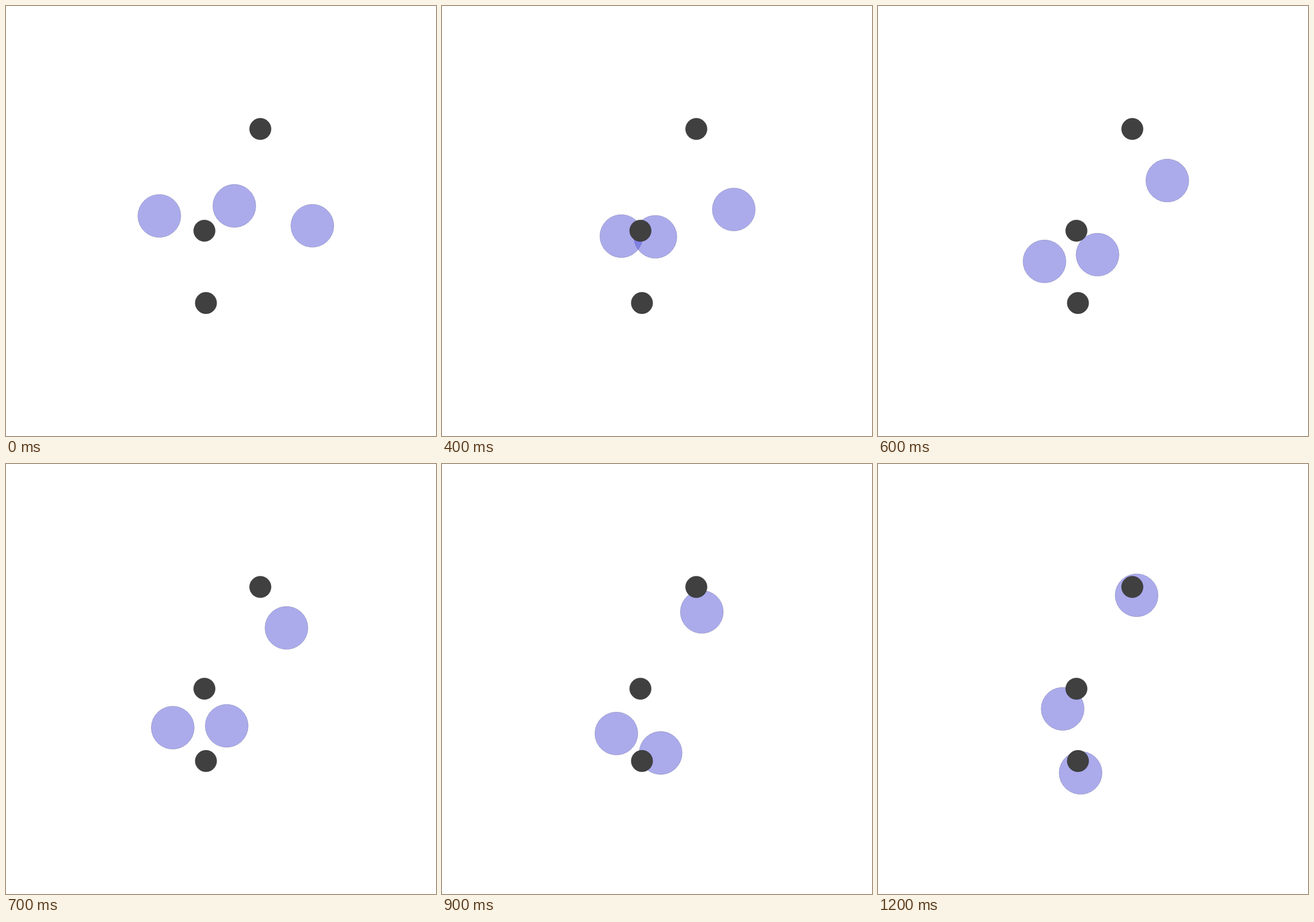
An HTML page for the animation above (1300 ms loop, 700x700 px).

```html
<!DOCTYPE html>
<html lang="en">
<head>
<meta charset="utf-8">
<title>Drifting circles</title>
<style>
  html, body { margin: 0; width: 100%; height: 100%; overflow: hidden; background: #fff; }
  svg { display: block; width: 100vw; height: 100vh; }
  .agent { fill: rgb(89 89 217 / .5); stroke: rgb(45 45 108 / .25); }
  .anchor { fill: #404040; stroke: rgb(32 32 32 / .5); }
</style>
</head>
<body>
<svg viewBox="0 0 700 700"></svg>
<script>
  const STEP = 100, STEPS = 13, LAST = STEPS - 1;
  const BOUNCE = 4; // the step at which the two left agents collide
  const SIDES = 30;

  // Bézier control points before and after the bounce.
  const agents = [
    { before: [[249.6, 341.7], [292, 374.6]],
      after: [[292, 374.6], [239.2, 440.1], [300.3, 467.8], [300.6, 398.6]] },
    { before: [[371.7, 325.4], [366.5, 353.9], [347.4, 375.7]],
      after: [[347.4, 375.7], [365.6, 395.7], [365.7, 508.6], [329.8, 502.8]] },
    { before: [[498.7, 357.7], [480.2, 376.1], [475, 331.3]],
      after: [[475, 331.3], [502.4, 255.7], [370.2, 236], [421, 213.7]] }
  ];
  const anchors = [[414, 200.2], [323, 365.8], [325.5, 483.5]];

  const svg = document.querySelector('svg');

  function addDisc(name, radius) {
    const disc = document.createElementNS(svg.namespaceURI, 'polygon');
    const corners = Array.from({ length: SIDES }, (_, i) => {
      const angle = 2 * Math.PI * i / SIDES;
      return [radius * Math.cos(angle), radius * Math.sin(angle)];
    });
    disc.setAttribute('points', corners.join(' '));
    disc.setAttribute('class', name);
    return svg.appendChild(disc);
  }

  function place(disc, point) {
    disc.setAttribute('transform', `translate(${point})`);
  }

  // Point on a Bézier curve of any degree.
  function bezier(points, u) {
    if (points.length === 1) return points[0];
    const a = bezier(points.slice(0, -1), u), b = bezier(points.slice(1), u);
    return a.map((value, i) => value + (b[i] - value) * u);
  }

  function position({ before, after }, step) {
    return step < BOUNCE
      ? bezier(before, step / BOUNCE)
      : bezier(after, (step - BOUNCE) / (LAST - BOUNCE));
  }

  for (const agent of agents) agent.disc = addDisc('agent', 35);
  for (const point of anchors) place(addDisc('anchor', 17.5), point);

  function draw() {
    const step = Math.floor(performance.now() / STEP) % STEPS;
    for (const agent of agents) place(agent.disc, position(agent, step));
    requestAnimationFrame(draw);
  }
  draw();
</script>
</body>
</html>
```
